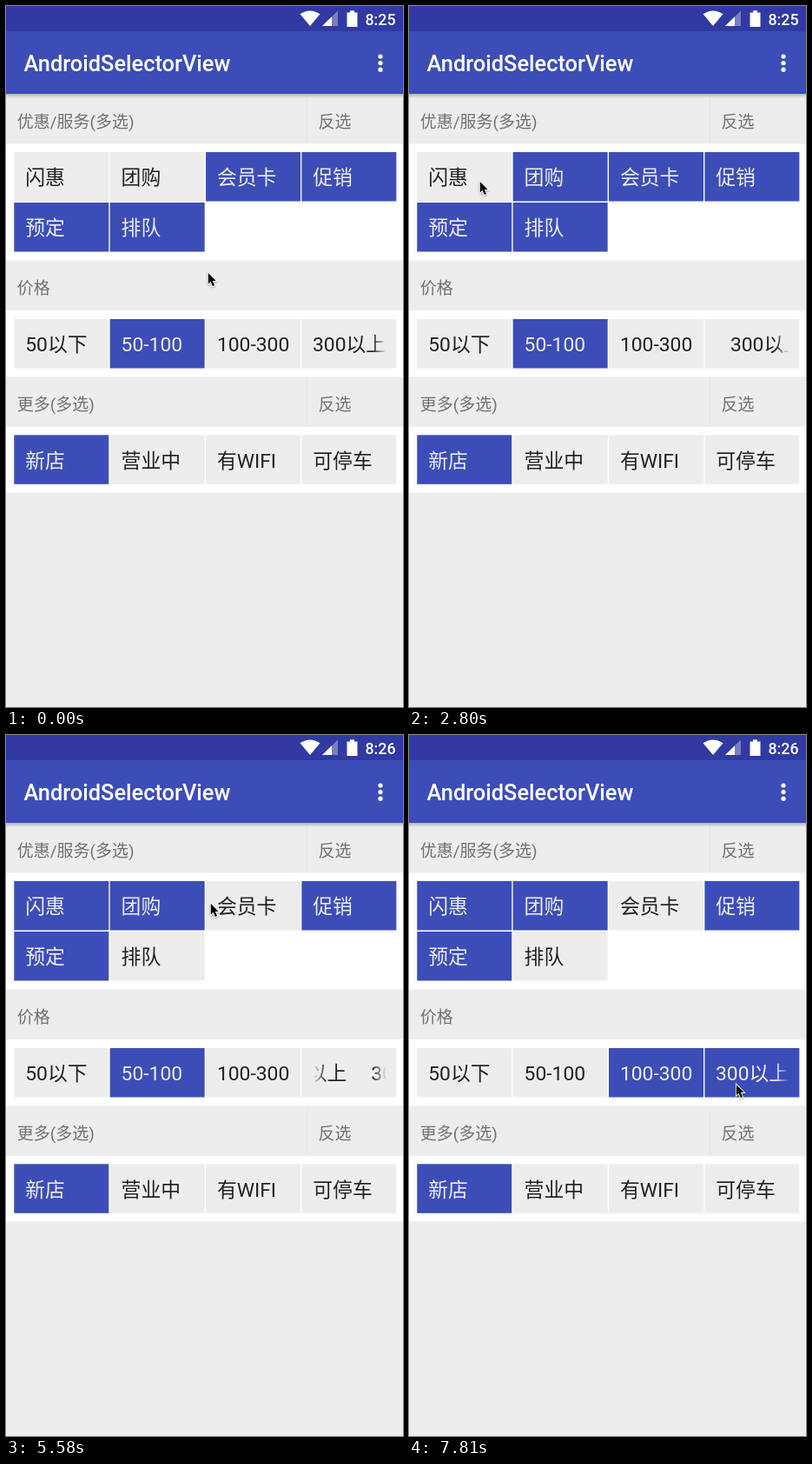
Write an HTML page with a canvas that moves like this. It is 457x806 px and loops after 8 s.

```html
<!DOCTYPE html>
<html lang="zh-CN">
<head>
<meta charset="utf-8">
<style>
html, body { margin: 0; width: 100%; height: 100%; overflow: hidden; background: #ededed; }
canvas { display: block; }
</style>
</head>
<body>
<canvas id="stage" width="457" height="806"></canvas>
<script>
const ctx = document.getElementById('stage').getContext('2d');
const LOOP = 8000, STEP = 147.36, LAST_STEP = 53;
const BLUE = '#3d4db7', GREY = '#ededed', DARK = '#212121';
const FONT = 'Roboto, "Noto Sans CJK SC", "Noto Sans CJK", sans-serif';

// [top, title, has an invert button]
const headers = [[101, '优惠/服务(多选)', true], [292, '价格', false], [426, '更多(多选)', true]];

// [label, column, top, selected at start, time of toggle]
const cells = [
  ['闪惠', 0, 168, false, 3090], ['团购', 1, 168, false, 2050],
  ['会员卡', 2, 168, true, 5440], ['促销', 3, 168, true],
  ['预定', 0, 226, true], ['排队', 1, 226, true, 4100],
  ['50以下', 0, 360, false], ['50-100', 1, 360, true, 6600],
  ['100-300', 2, 360, false, 6600], ['300以上', 3, 360, false, 7700],
  ['新店', 0, 493.3, true], ['营业中', 1, 493.3, false],
  ['有WIFI', 2, 493.3, false], ['可停车', 3, 493.3, false]
];

// pointer moves: [start, end, x, y]
const moves = [
  [0, 140, 225, 294], [400, 1300, 190, 196], [2150, 2750, 81, 201],
  [3200, 3800, 156, 236], [4750, 5300, 235, 193], [5850, 6450, 253, 388],
  [6850, 7350, 376, 401]
];

const marquee = { left: 353, right: 438, cycle: 112, speed: 0.0393, starts: [380, 4460], fade: 16 };

function rect(x, y, w, h, color) {
  ctx.fillStyle = color;
  ctx.fillRect(x, y, w, h);
}

function text(str, x, y, size, color, weight = 400) {
  ctx.font = `${weight} ${size}px ${FONT}`;
  ctx.fillStyle = color;
  ctx.fillText(str, x, y);
}

function shape(path, color) {
  ctx.fillStyle = color;
  ctx.fill(new Path2D(path));
}

function drawBars(t) {
  rect(0, 0, 457, 29, '#303aa2');
  rect(0, 29, 457, 72, BLUE);
  const shadow = ctx.createLinearGradient(0, 101, 0, 106);
  shadow.addColorStop(0, 'rgba(0,0,0,.24)');
  shadow.addColorStop(1, 'rgba(0,0,0,0)');
  rect(0, 101, 457, 5, shadow);

  shape('M350 23 L338.5 9.3 Q350 1.5 361.5 9.3 Z', '#fff');
  shape('M364 23 L382 5.5 V23 Z', 'rgba(255,255,255,.35)');
  shape('M364 23 L375 12.3 V23 Z', '#fff');
  shape('M392.5 7.5 H396 V5.3 H401 V7.5 H404.5 V24 H392.5 Z', '#fff');
  text(t < 3400 ? '8:25' : '8:26', 413.5, 21.5, 17.8, '#fff', 500);
  text('AndroidSelectorView', 20.5, 75.3, 25.4, '#fff', 500);
  for (const y of [58, 65.6, 73.2]) {
    ctx.beginPath();
    ctx.arc(431, y, 2.6, 0, 7);
    ctx.fill();
  }
}

function drawHeader([y, title, invert]) {
  text(title, 12.7, y + 39, 19, '#727272');
  if (!invert) return;
  rect(346, y, 1, 57, '#e3e3e3');
  text('反选', 359.5, y + 39, 19, '#727272');
}

function marqueeOffset(t) {
  const start = marquee.starts.filter(s => s <= t).pop();
  const offset = start === undefined ? 0 : (t - start) * marquee.speed;
  return offset < marquee.cycle ? offset : 0;
}

function drawMarquee(label, y, color, t) {
  const { left, right, cycle, fade } = marquee;
  const offset = marqueeOffset(t), width = right - left;
  const edge = offset < 84 ? Math.min(offset, fade) : 0;
  const ink = ctx.createLinearGradient(left, 0, right, 0);
  if (edge > 0) ink.addColorStop(0, color + '00');
  ink.addColorStop(edge / width, color);
  ink.addColorStop(1 - fade / width, color);
  ink.addColorStop(1, color + '00');
  ctx.save();
  ctx.beginPath();
  ctx.rect(left, y - 30, width, 45);
  ctx.clip();
  text(label, left - offset, y, 22.85, ink);
  if (offset > 0) text(label, left - offset + cycle, y, 22.85, ink);
  ctx.restore();
}

function drawCell([label, col, y, on, toggle = Infinity], t) {
  const selected = on !== (t >= toggle);
  const x = 9.3 + 110.35 * col, base = y + 37.4;
  const color = selected ? GREY : DARK;
  rect(x, y, 109, 56.5, selected ? BLUE : GREY);
  if (label === '300以上') drawMarquee(label, base, color, t);
  else text(label, x + 12.9, base, 22.85, color);
}

function pointerAt(t) {
  let x = 232, y = 306;
  for (const [start, end, toX, toY] of moves) {
    const p = Math.min(1, Math.max(0, (t - start) / (end - start)));
    const e = p * p * (3 - 2 * p);
    x += (toX - x) * e;
    y += (toY - y) * e;
  }
  return [x, y];
}

function drawPointer(t) {
  ctx.save();
  ctx.translate(...pointerAt(t));
  const arrow = new Path2D('M.8 1 V13.4 L3.6 10.8 L5.8 16 L8 15 L5.8 10 H9.7 Z');
  ctx.shadowColor = 'rgba(0,0,0,.35)';
  ctx.shadowBlur = 2;
  ctx.shadowOffsetY = 1;
  ctx.strokeStyle = '#fff';
  ctx.lineWidth = 1.8;
  ctx.stroke(arrow);
  ctx.shadowColor = 'transparent';
  ctx.fillStyle = '#000';
  ctx.fill(arrow);
  ctx.restore();
}

function draw(t) {
  rect(0, 0, 457, 806, GREY);
  rect(0, 158.5, 457, 133.8, '#fff');
  rect(0, 350, 457, 76.3, '#fff');
  rect(0, 484, 457, 75.3, '#fff');
  headers.forEach(drawHeader);
  drawBars(t);
  cells.forEach(cell => drawCell(cell, t));
  drawPointer(t);
}

// The picture advances in even steps, like a low-rate screen capture.
const began = performance.now();
function tick() {
  const t = (performance.now() - began) % LOOP;
  draw(Math.min(LAST_STEP, Math.floor((t + 20) / STEP)) * STEP);
  requestAnimationFrame(tick);
}
tick();
</script>
</body>
</html>
```
